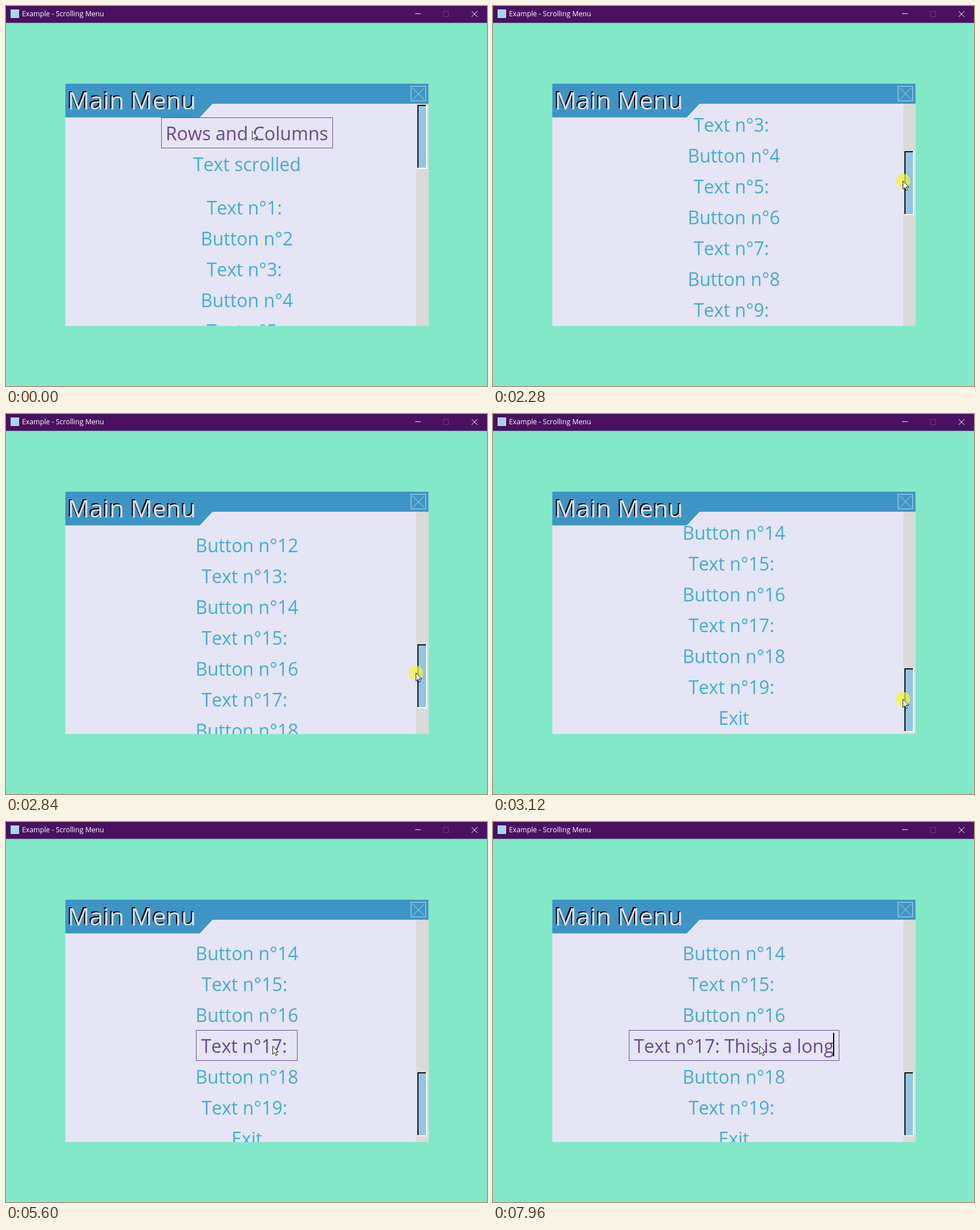
Animation of 843 by 665 pixels, one loop 8000 ms. Source, as an HTML page:

```html
<!DOCTYPE html>
<html lang="en">
<head>
<meta charset="utf-8">
<title>Scrolling Menu</title>
<style>
  html, body { margin: 0; width: 100%; height: 100%; overflow: hidden; background: #82e8c8; }
  svg { display: block; width: 843px; height: 665px; }
  text { font-family: "Open Sans", "Noto Sans", sans-serif; font-kerning: none; white-space: pre; }
  .item { font-size: 32px; fill: #43abdf; }
  .item.on { fill: #6a4694; }
  .title { font-size: 42.67px; }
  .line { fill: none; stroke-width: 1; }
</style>
</head>
<body>
<svg viewBox="0 0 843 665">
  <defs>
    <clipPath id="view"><rect x="104" y="195" width="615" height="365"/></clipPath>
  </defs>
  <rect width="843" height="665" fill="#82e8c8"/>

  <rect width="843" height="29.5" fill="#4a1160"/>
  <rect x="8" y="6" width="15" height="15" fill="#a9d5e8"/>
  <text x="28" y="18" font-size="12.25" fill="#fff">Example - Scrolling Menu</text>
  <path class="line" d="M717 13.5h10" stroke="#fff"/>
  <rect class="line" x="766.5" y="9.5" width="9" height="9" stroke="#6f3c83"/>
  <path class="line" d="M816 9l10 10M826 9l-10 10" stroke="#fff"/>

  <rect x="104" y="136" width="636.5" height="424" fill="#e5e5f5"/>
  <rect x="719" y="171" width="21.5" height="389" fill="#dadada"/>
  <g id="thumb">
    <rect x="721" width="17" height="112" fill="#fff"/>
    <rect x="721" width="15" height="110" fill="#0c0c0c"/>
    <rect x="723" y="2" width="13" height="108" fill="#93c5e4"/>
  </g>

  <g clip-path="url(#view)">
    <g id="list"></g>
    <rect id="frame" class="line" height="53" stroke="#6d4a95"/>
    <rect id="caret" width="2" height="41" fill="#000"/>
  </g>

  <path d="M104 136H740.5V171H362L339.5 195H104Z" fill="#3e95c5"/>
  <text class="title" x="106" y="179" fill="#000">Main Menu</text>
  <text class="title" x="108" y="181" fill="#e0e1f0">Main Menu</text>
  <g class="line" stroke="#c3dcee">
    <rect x="710" y="140.5" width="25.5" height="25.5"/>
    <path d="M713 143.500l20 20M733 143.500l-20 20"/>
  </g>

  <g id="mouse">
    <circle id="press" r="12.700" fill="#f8f23a" opacity=".7"/>
    <path d="M0 0V14.500L3.300 11.400L5.600 16.600L7.800 15.600L5.600 10.600H10.200Z" fill="#fff" stroke="#000" stroke-width=".9"/>
  </g>
</svg>
<script>
const LOOP = 8000, STEP = 40, MID = 422.5, ROW = 54;
const $ = id => document.getElementById(id);
const set = (el, attrs) => { for (const k in attrs) el.setAttribute(k, attrs[k]); };

// time, scroll offset
const scrollKeys = [
  [1800, 0], [1960, 40], [2200, 190], [2520, 442], [2640, 535],
  [2840, 717], [2960, 792], [3120, 847], [3480, 847], [3720, 825]
];
// time, x, y of the pointer tip
const mouseKeys = [
  [920, 431.5, 219], [1040, 452, 210], [1240, 585, 201], [1400, 690, 208], [1520, 723, 217],
  [1800, 723, 217], [1960, 720, 235], [2200, 718.5, 285], [2520, 718.5, 370], [2840, 718.5, 453],
  [3120, 718.5, 499], [3480, 718.5, 499], [3720, 718.5, 490], [4000, 504, 406], [4160, 467.5, 392]
];
const PRESS = [1800, 3720], FOCUS = 4040;
const blinks = [4640, 5160, 5600, 5920];

const typed = "This is a long";
const keyTimes = [6160, 6440, 6560, 6680, 6720, 6880, 6960, 7040, 7160, 7240, 7520, 7640, 7800, 7960];
const instant = [0, 3, 4, 13];   // keys whose recentring is not delayed
const lag = i => i === 3 || !instant.includes(i) ? STEP : 0;

function at(keys, t) {
  const n = keys.findIndex(k => k[0] > t);
  if (n === 0) return keys[0].slice(1);
  if (n < 0) return keys[keys.length - 1].slice(1);
  const a = keys[n - 1], b = keys[n], p = (t - a[0]) / (b[0] - a[0]);
  return a.slice(1).map((v, i) => v + (b[i + 1] - v) * p);
}

// whole-pixel glyph advances
const pen = document.createElement("canvas").getContext("2d");
pen.font = '32px "Open Sans", "Noto Sans", sans-serif';
const width = s => [...s].reduce((w, c) => w + Math.round(pen.measureText(c).width), 0);

const rows = [["Rows and Columns", 235], ["Text scrolled", 289]];
for (let n = 1; n <= 20; n++) {
  const label = n === 20 ? "Exit" : n % 2 ? `Text n°${n}: ` : `Button n°${n}`;
  rows.push([label, 365 + (n - 1) * ROW]);
}
const items = rows.map(([label, y]) => {
  const el = document.createElementNS("http://www.w3.org/2000/svg", "text");
  el.textContent = label;
  set(el, { class: "item", x: MID - width(label) / 2 - .3, y });
  $("list").append(el);
  return el;
});
const FIELD = 18, fieldLabel = rows[FIELD][0];

function draw(t) {
  const scroll = Math.round(at(scrollKeys, t)[0]);
  set($("list"), { transform: `translate(0 ${-scroll})` });
  set($("thumb"), { transform: `translate(0 ${Math.round(173 + scroll * .3213)})` });

  const [mx, my] = at(mouseKeys, t);
  set($("mouse"), { transform: `translate(${mx} ${my})` });
  set($("press"), { visibility: t >= PRESS[0] && t < PRESS[1] ? "visible" : "hidden" });

  const editing = t >= FOCUS, active = editing ? FIELD : 0;
  items[0].classList.toggle("on", !editing);
  items[FIELD].classList.toggle("on", editing);

  const count = keyTimes.filter(k => t >= k).length;
  const centred = keyTimes.filter((k, i) => t >= k + lag(i)).length;
  const text = editing ? fieldLabel + typed.slice(0, count) : rows[0][0];
  const base = editing ? fieldLabel + typed.slice(0, centred) : text;
  const pad = editing ? 19 : 16;
  const left = Math.floor(MID - (width(base) + pad) / 2);
  const top = rows[active][1] - 40 - scroll;
  const start = left + (editing ? 9 : 8);

  items[FIELD].textContent = editing ? text : fieldLabel;
  set(items[FIELD], { x: editing ? start : MID - width(fieldLabel) / 2 - .3 });
  set($("frame"), { x: left + .5, y: top + .5, width: width(text) + pad - 1 });

  const lit = blinks.filter(b => t >= b).length % 2 === 0;
  set($("caret"), {
    x: start + width(text) - 1, y: top + 5,
    visibility: editing && lit ? "visible" : "hidden"
  });
}

const begin = performance.now();
function tick() {
  const t = (performance.now() - begin) % LOOP;
  draw(Math.floor(t / STEP) * STEP);
  requestAnimationFrame(tick);
}
draw(0);
requestAnimationFrame(tick);
</script>
</body>
</html>
```
